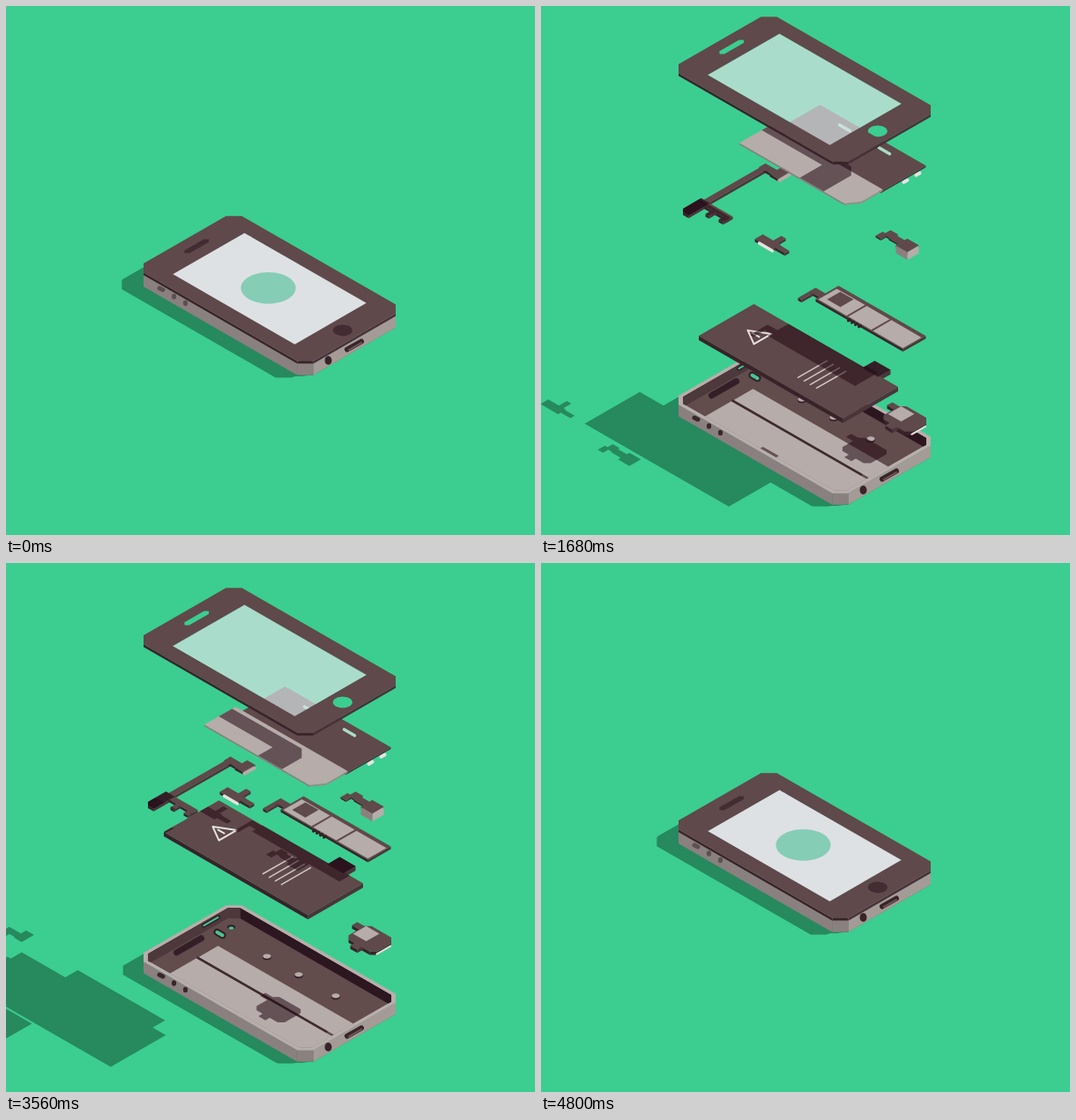
These frames come from a looping animation (600x600 px, 5.24 s). An HTML page with a canvas:

```html
<!DOCTYPE html>
<html lang="en">
<head>
<meta charset="utf-8">
<title>Exploded phone</title>
<style>
  html, body { margin: 0; width: 100%; height: 100%; overflow: hidden; background: #3bce90; }
  canvas { display: block; width: 600px; height: 600px; }
</style>
</head>
<body>
<canvas id="stage" width="600" height="600"></canvas>
<script>
const ctx = document.getElementById('stage').getContext('2d');
const LOOP = 5240;
const BG = '#3bce90', GROUND_SHADE = '#27895e', SHADE = 'rgba(35,10,20,.55)';
const TOP = '#5f494a', LEFT = '#38232a', RIGHT = '#4a353a', DARK = '#331f27';
const LIGHT = '#b6acaa', PALE = '#e6e2e1', HOLE = '#45c592';

// --- Motion ---
const clamp = x => Math.max(0, Math.min(1, x));

// Smooth curve through [time, value] keys, flat at peaks and ends.
function curve(keys) {
  const last = keys.length - 1;
  const slope = i => (keys[i + 1][1] - keys[i][1]) / (keys[i + 1][0] - keys[i][0]);
  const tangent = keys.map((_, i) => {
    if (i === 0 || i === last) return 0;
    const a = slope(i - 1), b = slope(i);
    return a * b > 0 ? 2 * a * b / (a + b) : 0;
  });
  return t => {
    if (t <= keys[0][0]) return keys[0][1];
    if (t >= keys[last][0]) return keys[last][1];
    let i = 0;
    while (t > keys[i + 1][0]) i++;
    const [t0, a] = keys[i], [t1, b] = keys[i + 1];
    const w = t1 - t0, s = (t - t0) / w, r = 1 - s;
    return a * (1 + 2 * s) * r * r + b * s * s * (3 - 2 * s)
      + w * s * r * (tangent[i] * r - tangent[i + 1] * s);
  };
}
// Every part rises with the same gesture: ease in, overshoot, settle.
function spring(rise, start, length, over) {
  const ease = curve([[0, 0], [.26, .295], [.34, .438], [.64, 1 + over], [.95, 1]]);
  return t => rise * ease((t - start) / length);
}
function caseDrop(t) {
  const s = clamp((t - 640) / 1040);
  return 147 * (s < .5 ? 4 * s ** 3 : 1 - 4 * (1 - s) ** 3);
}
const coverLift = spring(210, 500, 1600, .1);
// Closing runs the opening backwards at its own pace.
const rewind = curve([[3280, 2400], [3560, 2120], [3840, 1560], [4120, 1040], [4400, 600], [4800, 0]]);

// --- Geometry: u runs down-right, v runs down-left ---
const iso = (u, v) => [258.5 + u - v, 233 + .575 * (u + v)];
const plane = (...uv) => uv.map(p => iso(...p));
const box = (u0, v0, u1, v1, c = 0) => plane(
  [u0 + c, v0], [u1 - c, v0], [u1, v0 + c], [u1, v1 - c],
  [u1 - c, v1], [u0 + c, v1], [u0, v1 - c], [u0, v0 + c]);
const disc = (u, v, r) => Array.from({ length: 40 }, (_, i) =>
  iso(u + r * Math.cos(i * Math.PI / 20), v + r * Math.sin(i * Math.PI / 20)));
const shift = (p, dy) => p.map(([x, y]) => [x, y + dy]);
const cut = p => [...p].reverse();
const wall = ([x, y], [X, Y], z) => [[x, y], [X, Y], [X, Y + z], [x, y + z]];

function outline(...loops) {
  const path = new Path2D();
  for (const loop of loops) {
    loop.forEach(([x, y], i) => i ? path.lineTo(x, y) : path.moveTo(x, y));
    path.closePath();
  }
  return path;
}

// --- Drawing ---
function fill(p, color) {
  ctx.fillStyle = color;
  ctx.fill(p instanceof Path2D ? p : outline(p));
}
function stroke(points, color, width) {
  ctx.strokeStyle = color;
  ctx.lineWidth = width;
  ctx.lineCap = ctx.lineJoin = 'round';
  ctx.beginPath();
  points.forEach(p => ctx.lineTo(...p));
  ctx.stroke();
}
function oval(x, y, rx, ry, color) {
  ctx.fillStyle = color;
  ctx.beginPath();
  ctx.ellipse(x, y, rx, ry, 0, 0, 7);
  ctx.fill();
}
function eachEdge(p, draw) {
  p.forEach((a, i) => draw(a, p[(i + 1) % p.length]));
}
function slab(loops, z, top = TOP, left = LEFT, right = RIGHT, face = outline(...loops)) {
  for (const loop of loops) eachEdge(loop, (a, b) => {
    if (b[0] < a[0]) fill(wall(a, b, z), b[1] < a[1] + .1 ? left : right);
  });
  fill(face, top);
}
function at(dy, draw, clip) {
  ctx.save();
  ctx.translate(0, dy);
  if (clip) {
    ctx.clip(clip);
    ctx.translate(0, -dy);
  }
  draw();
  ctx.restore();
}

// --- Parts from bottom to top, as blocks on the plane ---
const parts = [
  { // speaker module
    base: 4, lift: spring(71, 1300, 1100, .06),
    blocks: [box(154, 2, 186, 28, 4), box(146, 6, 156, 12), box(165, 26, 173, 33)],
    draw() {
      slab(this.blocks, 4);
      stroke(shift(plane([186, 8], [186, 24]), 3), PALE, 2);
      fill(box(155, 5, 170, 20), LIGHT);
    }
  },
  { // battery
    base: 7, lift: spring(139, 1120, 1360, .16),
    blocks: [box(21.5, 38.5, 185, 101), box(146, 26, 164, 40)],
    draw() {
      slab(this.blocks, 5);
      fill(box(146, 26, 164, 40), DARK);
      stroke(plane([44, 68], [61, 58], [61, 78], [44, 68]), PALE, 2);
      stroke(plane([50, 68], [57, 68]), PALE, 2);
      for (let u = 119; u <= 140; u += 7) stroke(plane([u, 53], [u, 86]), '#cfc6c4', 1.6);
    }
  },
  { // logic board
    base: 9, lift: spring(161, 1040, 1400, .17),
    blocks: [box(86, 7, 185, 33), box(75, 22, 87, 29), box(75, 24, 79, 42)],
    draw() {
      slab(this.blocks, 3);
      for (let u = 126; u < 142; u += 4) stroke(plane([u, 34], [u, 36]), DARK, 3);
      for (const [a, b] of [[88, 120], [122, 148], [150, 184]]) fill(box(a, 11, b, 32), LIGHT);
      fill(box(93, 12, 108, 27), TOP);
    }
  },
  { // dock connector
    base: 10, lift: spring(172, 1070, 1130, .1),
    blocks: [box(30, 37, 50, 46), box(50, 38, 61, 43), box(42, 28, 47, 38)],
    draw() {
      slab(this.blocks, 3);
      stroke(shift(plane([35, 46], [50, 46]), 2), PALE, 3.5);
    }
  },
  { // camera
    base: 9, lift: spring(216, 1060, 1100, .1),
    blocks: [box(144, 6, 152, 14), box(141, 12, 147, 20), box(151, 8, 164, 15), box(162, 5, 175, 18)],
    draw() {
      slab(this.blocks, 2);
      slab([box(162, 5, 175, 18)], 9, TOP, '#8b807e', LIGHT);
    }
  },
  { // button cable
    base: 10, lift: spring(173, 900, 1240, .24),
    blocks: [box(0, 77, 10, 101), box(9, 77, 36, 83), box(18, 82, 22, 90), box(31, 82, 36, 88),
      box(3, 10, 9, 78), box(2, 6, 17, 13), box(15, 0, 24, 14)],
    draw() {
      slab(this.blocks, 3);
      fill(box(0, 77, 10, 101), DARK);
      stroke(shift(plane([25, 2], [25, 13]), 2), LIGHT, 4);
    }
  },
  { // display assembly
    base: 8, lift: spring(289, 790, 1420, .1),
    blocks: [box(63, 5, 183, 56), plane([55, 53], [182, 53], [182, 77], [174, 88.5], [55, 88.5])],
    draw() {
      for (const v of [18, 32]) stroke(plane([187, v - 2], [187, v + 2]), PALE, 4);
      slab(this.blocks.slice(0, 1), 2);
      slab(this.blocks.slice(1), 2, LIGHT, '#8a7f7e', '#978c8a');
      for (const u of [94, 139]) stroke(plane([u, 14], [u + 12, 14]), '#a9dcc6', 3.5);
    }
  }
];
for (const p of parts) p.path = outline(...p.blocks);

// --- Case and cover ---
const body = box(0, 0, 192.5, 111.5, 9);
const rim = shift(body, 3);
const mouth = shift(box(3.5, 3.5, 189, 108, 7), 3);
const mouthPath = outline(mouth);
// Everything above the near rim of the case.
const insidePath = outline([[mouth[1][0], -400], ...mouth.slice(1, 7), [mouth[6][0], -400]]);
const slot = box(10.5, 42, 16, 69, 2.4), home = disc(179, 55.7, 7.8);
const holes = [cut(slot), cut(home)];
const glass = (from, to) => box(27 + 138.5 * from, 15, 27 + 138.5 * to, 96.5);

function drawFloor() {
  fill(mouth, '#624c4c');
  at(14, () => {
    fill(box(26, 44, 195, 66), LIGHT);
    fill(box(26, 68.5, 195, 115), LIGHT);
    stroke(plane([26, 67.2], [172, 67.2]), '#3e2b2f', 2.5);
    for (const u of [64, 100, 142]) {
      fill(shift(disc(u, 26.5, 3.5), 1.5), DARK);
      fill(disc(u, 26.5, 3.2), LIGHT);
    }
    stroke(plane([9, 46], [9, 74]), DARK, 7);
    stroke(plane([12, 31], [18, 31]), DARK, 8);
    stroke(plane([12, 31], [18, 31]), HOLE, 4);
    fill(disc(15, 18, 3.2), DARK);
    fill(disc(16, 19, 2), HOLE);
  });
  eachEdge(mouth, (a, b) => {
    if (b[0] > a[0]) fill(wall(a, b, 12), b[1] > a[1] + .1 ? '#2c1721' : '#4d383b');
  });
  const port = shift(plane([4, 22], [4, 38]), 7);
  stroke(port, DARK, 5);
  stroke(port, HOLE, 2);
}

function drawCase(open) {
  slab([rim], 13, '#b8aeab', '#8a807f', '#a49b97');
  const hole = open ? '#3a262b' : '#5c5051', socket = '#39242a';
  stroke([[174, 320], [178, 322]], hole, 5);
  for (const i of [0, 1]) oval(190.5 + 13 * i, 329.5 + 7.5 * i, 2.6, 3.2, hole);
  oval(365.5, 402, 4, 5, socket);
  stroke([[387, 389.5], [403, 380.5]], socket, 6);
  stroke([[389, 390], [403, 382]], '#6d5a59', 2);
}

function drawCover(t, rise, wipe) {
  // The openings stay dark until the cover leaves the case.
  ctx.globalAlpha = 1 - clamp(rise / 20);
  fill(outline(slot, home), '#432d33');
  ctx.globalAlpha = 1;
  slab([body], 3, TOP, LEFT, '#46313a', outline(body, ...holes, cut(glass(0, 1))));
  if (wipe > 0) fill(glass(0, wipe), 'rgba(217,227,230,.7)');
  if (wipe < 1) fill(glass(wipe, 1), '#dde1e4');
  stroke(plane([27, 96], [27, 15], [165, 15]), 'rgba(70,50,55,.45)', 1);
  ctx.globalAlpha = 1 - clamp((t - 100) / 400);
  fill(disc(95, 56, 22), '#85cdb5');
  ctx.globalAlpha = 1;
}

// --- Shadows slide left and down with the height of the caster ---
function shadowOn(height, casters) {
  const path = new Path2D();
  for (const c of casters) {
    const d = c.height - height;
    if (d > 2) path.addPath(c.path, { e: -1.37 * d, f: c.dy + 1.055 * d });
  }
  return path;
}
function caseShadow(drop) {
  for (let d = 0; d <= 17; d++) {
    fill(rim.map(([x, y]) => [x - 1.37 * d, y + drop + 13 + .1 * d]), GROUND_SHADE);
  }
}

function render(ms) {
  const t = ms < 2400 ? ms : ms < 3280 ? 2400 : rewind(ms);
  const drop = caseDrop(t), rise = coverLift(t), wipe = clamp((t - 800) / 280);
  for (const p of parts) {
    const up = p.lift(t);
    p.dy = drop + 18 - p.base - up;
    p.height = up + p.base;
  }
  const cover = {
    dy: -rise, height: drop + rise + 18,
    path: outline(body, ...holes, cut(glass(0, wipe)))
  };
  const casters = [...parts, cover];

  ctx.fillStyle = BG;
  ctx.fillRect(0, 0, 600, 600);
  fill(shadowOn(0, casters), GROUND_SHADE);
  caseShadow(drop);

  at(drop, () => drawCase(t > 700));
  at(drop, () => at(drop, drawFloor), mouthPath);
  at(drop, () => fill(shadowOn(2, casters), SHADE), mouthPath);
  at(drop, () => {
    for (const p of parts) {
      at(p.dy, () => p.draw());
      at(p.dy, () => fill(shadowOn(p.height, casters), SHADE), p.path);
    }
  }, insidePath);
  at(-rise, () => drawCover(t, rise, wipe));
}

const start = performance.now();
function tick() {
  render((performance.now() - start) % LOOP);
  requestAnimationFrame(tick);
}
tick();
</script>
</body>
</html>
```
